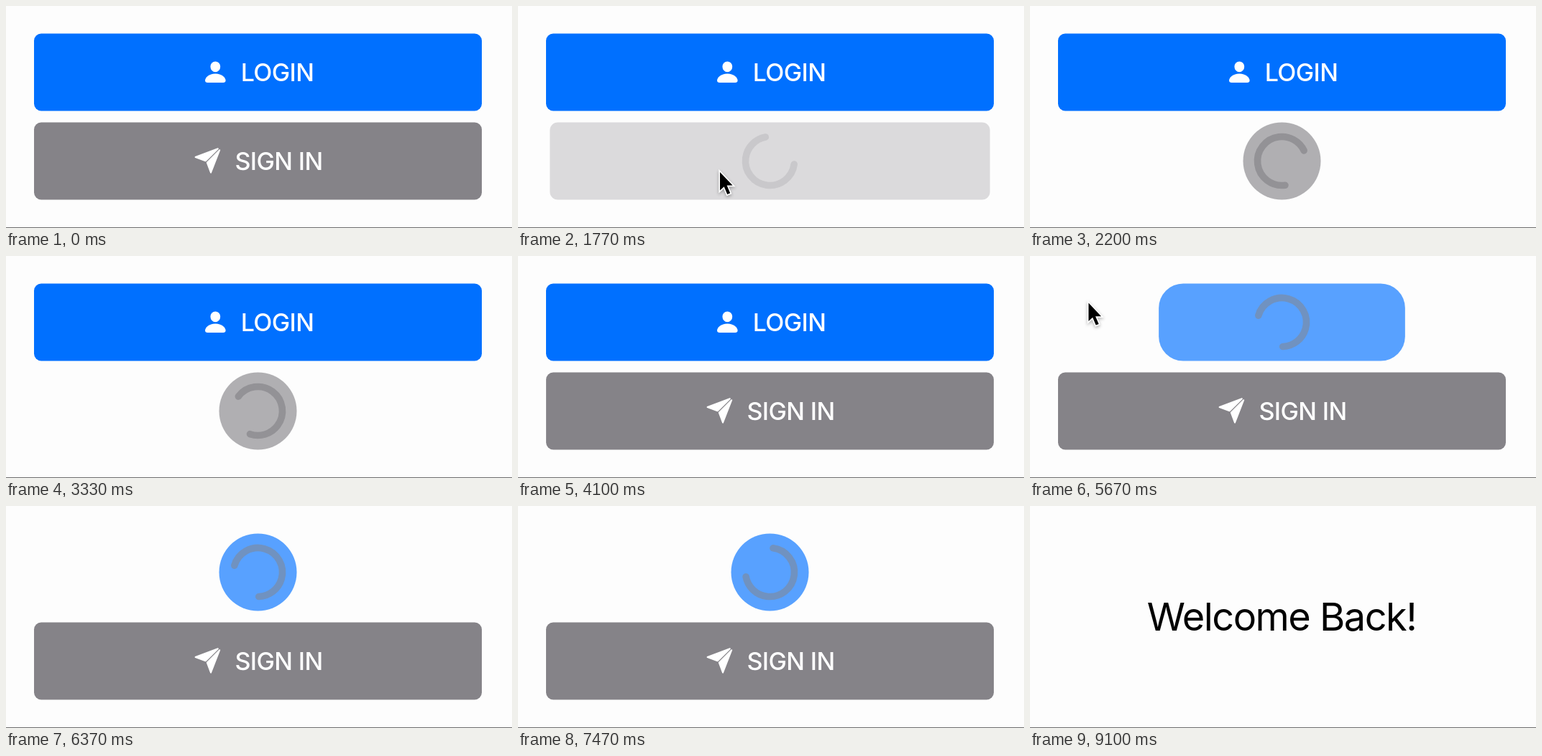
These frames come from a looping animation (704 px wide and 310 px high, 9810 ms). An HTML page with a canvas:

```html
<!DOCTYPE html>
<html lang="en">
<head>
<meta charset="utf-8">
<title>Loading buttons</title>
<style>
html, body { margin: 0; width: 100%; height: 100%; overflow: hidden; background: #fdfdfd; }
canvas { display: block; width: 704px; height: 310px; }
</style>
</head>
<body>
<canvas id="stage" width="704" height="310"></canvas>
<script>
const ctx = document.getElementById('stage').getContext('2d');
const LOOP = 9810, EASE_MS = 350, PRESS_MS = 100, RELEASE_MS = 170, WELCOME_AT = 7530;
const CENTER_X = 350.5, FULL_W = 623, HEIGHT = 108, RADIUS = 10;
const FONT = 'Inter, Roboto, sans-serif';

const login = {
  y: 92.5, label: 'LOGIN', labelX: 377.5, icon: drawPerson,
  start: 5487, end: WELCOME_AT,
  full: [0, 112, 255], pressed: [191, 219, 255], busy: [88, 161, 255],
  ring: [112, 146, 192], pressedRing: [176, 203, 235]
};
const signIn = {
  y: 216.5, label: 'SIGN IN', labelX: 379.5, icon: drawPlane,
  start: 1735, end: 3755,
  full: [133, 131, 136], pressed: [223, 222, 224], busy: [176, 175, 178],
  ring: [147, 146, 150], pressedRing: [207, 206, 208]
};

// Pointer stops: time, tip x, tip y
const pointerPaths = [
  [[1370, 236, 318], [1640, 281, 232], [1780, 281, 232], [2140, 215, 322]],
  [[5030, -22, 120], [5370, 190, 96], [5500, 190, 94], [5670, 82, 66], [5870, -24, -14]]
];

const clamp = v => Math.min(1, Math.max(0, v));
const lerp = (a, b, p) => a + (b - a) * p;
const rgb = c => `rgb(${c.map(Math.round).join()})`;
const mix = (a, b, p) => a.map((v, i) => lerp(v, b[i], p));

// Ease in-out as cubic-bezier(.42, 0, .58, 1)
function ease(x) {
  x = clamp(x);
  let lo = 0, hi = 1;
  for (let i = 0; i < 20; i++) {
    const s = (lo + hi) / 2, r = 1 - s;
    if (3 * r * r * s * .42 + 3 * r * s * s * .58 + s * s * s < x) lo = s; else hi = s;
  }
  return lo * lo * (3 - 2 * lo);
}

function drawText(text, x, y, size, weight, color, spacing) {
  ctx.font = `${weight} ${size}px ${FONT}`;
  ctx.letterSpacing = spacing;
  ctx.textAlign = 'center';
  ctx.fillStyle = color;
  ctx.fillText(text, x, y);
}

function drawPerson() {
  ctx.fillStyle = '#fff';
  ctx.beginPath();
  ctx.ellipse(291.3, 84.8, 6.9, 7.4, 0, 0, 2 * Math.PI);
  ctx.fill();
  ctx.fill(new Path2D('M280.5 107C278.2 107 277 106 277 104C277 100.4 282.3 94.6 291.3 94.6S305.6 100.4 305.6 104C305.6 106 304.4 107 302.1 107Z'));
}

function drawPlane() {
  ctx.fillStyle = ctx.strokeStyle = '#fff';
  ctx.lineWidth = 2;
  ctx.lineJoin = 'round';
  for (const d of ['M263.6 211L294.8 199.2L277.6 216.2Z', 'M297.2 201.2L285 232.6L279.8 218.6Z']) {
    const wing = new Path2D(d);
    ctx.fill(wing);
    ctx.stroke(wing);
  }
}

function drawSpinner(y, elapsed, color) {
  const from = 2 * Math.PI * ease(elapsed % EASE_MS / EASE_MS);
  ctx.beginPath();
  ctx.arc(CENTER_X, y, 34, from, from + 1.4 * Math.PI);
  ctx.lineWidth = 9.6;
  ctx.lineCap = 'round';
  ctx.strokeStyle = rgb(color);
  ctx.stroke();
}

function drawButton(b, t) {
  const elapsed = t - b.start;
  const shrink = ease(elapsed / EASE_MS) - ease((t - b.end) / EASE_MS);
  const released = clamp(elapsed / RELEASE_MS);
  let color = b.full;
  if (t >= b.end) color = mix(b.full, b.busy, shrink);
  else if (elapsed >= 0) color = mix(b.pressed, b.busy, ease(released));
  else if (elapsed >= -PRESS_MS) color = b.pressed;

  const width = lerp(FULL_W, HEIGHT, shrink);
  ctx.fillStyle = rgb(color);
  ctx.beginPath();
  ctx.roundRect(CENTER_X - width / 2, b.y - HEIGHT / 2, width, HEIGHT, lerp(RADIUS, HEIGHT / 2, shrink));
  ctx.fill();

  if (elapsed >= 0 && t < b.end) {
    drawSpinner(b.y, elapsed, mix(b.pressedRing, b.ring, ease(released)));
  } else {
    b.icon();
    drawText(b.label, b.labelX, b.y + 12.5, 34, 500, '#fff', '-0.6px');
  }
}

function drawPointer(t) {
  const path = pointerPaths.find(p => t >= p[0][0] && t < p[p.length - 1][0]);
  if (!path) return;
  const i = path.findIndex(stop => stop[0] > t);
  const [t0, x0, y0] = path[i - 1], [t1, x1, y1] = path[i];
  const p = (t - t0) / (t1 - t0);
  const arrow = new Path2D('M0 0V25.5L5.7 20.2L10.2 31L14.2 29.3L9.6 18.6H17.6Z');
  ctx.save();
  ctx.translate(lerp(x0, x1, p), lerp(y0, y1, p));
  ctx.lineJoin = 'miter';
  ctx.lineWidth = 3.4;
  ctx.strokeStyle = '#fff';
  ctx.shadowColor = 'rgba(0,0,0,.3)';
  ctx.shadowBlur = 4;
  ctx.shadowOffsetY = 2;
  ctx.stroke(arrow);
  ctx.shadowColor = 'transparent';
  ctx.fillStyle = '#000';
  ctx.fill(arrow);
  ctx.restore();
}

function draw(t) {
  ctx.fillStyle = '#fdfdfd';
  ctx.fillRect(0, 0, 704, 310);
  if (t < WELCOME_AT) {
    drawButton(login, t);
    drawButton(signIn, t);
  } else {
    drawText('Welcome Back!', 350, 174, 54, 400, '#000', '-1.5px');
  }
  ctx.fillStyle = '#6c6c6c';
  ctx.fillRect(0, 309, 704, 1);
  drawPointer(t);
}

const began = performance.now();
function tick() {
  draw((performance.now() - began) % LOOP);
  requestAnimationFrame(tick);
}
tick();
</script>
</body>
</html>
```
